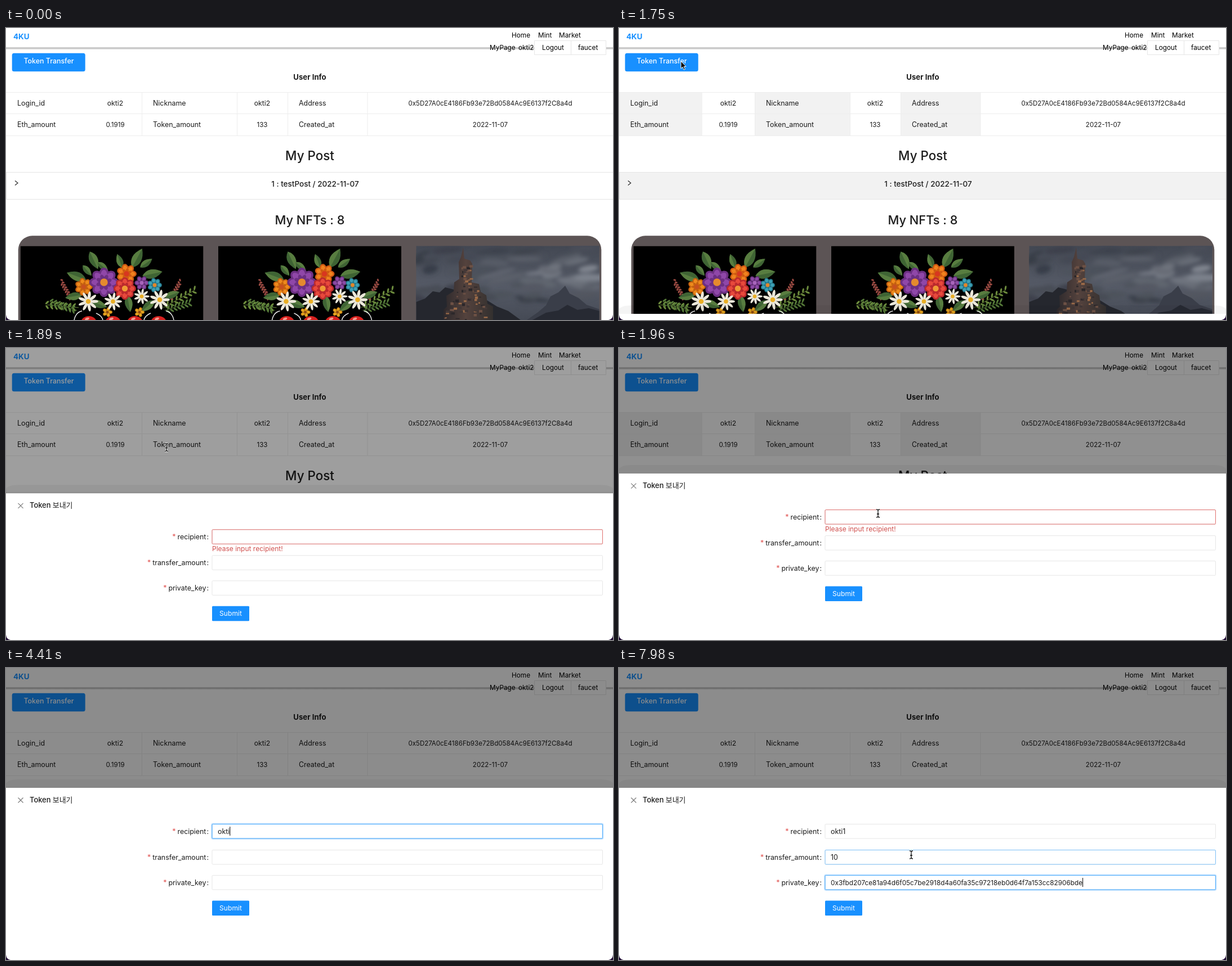
An HTML page for the animation above (8 s loop, 1078 by 519 pixels).

```html
<!DOCTYPE html>
<html lang="en">
<head>
<meta charset="utf-8">
<title>Token transfer</title>
<style>
  html, body { margin: 0; width: 100%; height: 100%; overflow: hidden; background: #fff; }
  svg { display: block; width: 1078px; height: 519px; }
  text { font: 12.4px Inter, "Noto Sans CJK KR", "Noto Sans CJK", sans-serif; fill: #1c1c1c; white-space: pre; }
  .nav text { font-size: 11.8px; fill: #000; }
  .num text, text.num { font-size: 11.6px; }
  text.num { font-size: 11.8px; }
  text.mid, .mid text { text-anchor: middle; }
  text.end { text-anchor: end; }
  text.big { font-size: 22.4px; font-weight: 500; }
  text.medium { font-weight: 500; }
  text.light { fill: #fff; }
  .rule { stroke: #ededed; fill: none; }
  .box { fill: #fff; stroke: #e6e6e6; }
  .ring { fill: none; stroke: #40a9ff; }
  .glow { fill: none; stroke: #1890ff; stroke-opacity: .25; stroke-width: 2.5; }
  .red { stroke: #e0706e; }
</style>
</head>
<body>
<svg viewBox="0 0 1078 519">
  <defs>
    <linearGradient id="sky" x2="0" y2="1">
      <stop stop-color="#434853"/><stop offset=".55" stop-color="#565b67"/><stop offset="1" stop-color="#454a55"/>
    </linearGradient>
    <linearGradient id="edge" x2="0" y2="1">
      <stop stop-color="#d8d8d8"/><stop offset=".5" stop-color="#c2c2c2"/><stop offset="1" stop-color="#e4e4e4"/>
    </linearGradient>
    <linearGradient id="stone">
      <stop stop-color="#2d292c"/><stop offset=".45" stop-color="#54423d"/><stop offset="1" stop-color="#33302f"/>
    </linearGradient>
    <filter id="soft"><feGaussianBlur stdDeviation="3.500"/></filter>
    <clipPath id="pic"><path d="M728.500 387.500h325V519h-325z"/></clipPath>
    <clipPath id="art"><path d="M25.500 387.500h325V519h-325z"/></clipPath>
  </defs>

  <rect width="1078" height="519" fill="#fff"/>
  <rect y="34" width="1078" height="4" fill="url(#edge)"/>
  <text x="13" y="20" style="font-size:13.4px;font-weight:700;fill:#1890ff">4KU</text>
  <path class="box" d="M938.500 22.500h127v25h-127zM1003.500 22.500v25"/>
  <g class="nav">
    <text x="898" y="17">Home</text><text x="945" y="17">Mint</text><text x="982" y="17">Market</text>
    <text x="859" y="39">MyPage</text><text x="910" y="39">okti2</text>
    <text x="952" y="39">Logout</text><text x="1016" y="39">faucet</text>
  </g>

  <rect x="10.700" y="44.700" width="130" height="32.600" rx="3.500" fill="#1890ff"/>
  <text class="mid light medium" x="76" y="62.500">Token Transfer</text>
  <text class="mid" x="539.500" y="92" style="font-size:13.200px;font-weight:700">User Info</text>

  <path id="tint" fill-opacity=".05" d="M0 115h148v76H0zM241 115h169v76H241zM500 115h142v76H500zM0 257h1078v47H0z"/>
  <path class="rule" d="M0 114.500H1078M0 152.500H1078M0 191.500H1078M241.500 115v76M410.500 115v76M500.500 115v76M642 115v76"/>
  <text x="20" y="138">Login_id</text><text x="20" y="176">Eth_amount</text>
  <text x="261" y="138">Nickname</text><text x="261" y="176">Token_amount</text>
  <text x="520" y="138">Address</text><text x="520" y="176">Created_at</text>
  <g class="num mid">
    <text x="194" y="137.500" style="font-size:12.200px">okti2</text><text x="194" y="176">0.1919</text>
    <text x="455" y="137.500" style="font-size:12.200px">okti2</text><text x="455" y="176">133</text>
    <text x="860" y="137.500">0x5D27A0cE4186Fb93e72Bd0584Ac9E6137f2C8a4d</text>
    <text x="860" y="176">2022-11-07</text>
  </g>

  <text class="mid big" x="539.500" y="235">My Post</text>
  <path class="rule" style="stroke:#e4e4e4" d="M.5 256.500H1078M.5 304.500H1078M.5 256v48"/>
  <path d="M16 271.500l5 4-5 4" fill="none" stroke="#222" stroke-width="1.100"/>
  <text class="mid medium" x="549" y="281.500" style="font-size:13.500px">1 : testPost / 2022-11-07</text>
  <text class="mid big" x="539.500" y="348.500" style="font-size:21.800px">My NFTs : 8</text>

  <rect x="21.700" y="369.300" width="1035.600" height="200" rx="25" fill="#5c5455"/>
  <g id="bouquet" clip-path="url(#art)"><rect x="25.500" y="387.500" width="325" height="132"/></g>
  <use href="#bouquet" x="351.500"/>
  <g clip-path="url(#pic)">
    <path d="M728 387h326v132H728z" fill="url(#sky)"/>
    <g id="clouds" filter="url(#soft)"></g>
    <path d="M925 519l20-14 14-12 8-16 14-7 12-12 8 14 16 8 14 12 23 8v19z" fill="#3a3e49"/>
    <path d="M935 519l24-13 22-4 16-10 18 9 20-3 19 5v16z" fill="#272a33"/>
    <path d="M728 519v-32l16-6 14-13 12 2 10-9 16 4 8-6 52 26 16 10 20 8 22 16z" fill="#25272e"/>
    <path d="M812 390l2 20 10 3 4 6-1 33 13 3 3 14 10 6 2 15 10 5v24h-88v-18l6-6-1-19 13-8 1-16 9-6-1-30 4-9z" fill="url(#stone)"/>
    <g id="castle"></g>
  </g>

  <rect id="mask" width="1078" height="519"/>
  <g id="drawer">
    <path fill-opacity=".045" d="M0 306V-8q4-7 22-7H1056q18 0 22 7V306z"/>
    <rect width="1078" height="320" fill="#fff"/>
    <path d="M21.500 17.500l9 9m0-9l-9 9" stroke="#777" stroke-width="1.100"/>
    <text class="medium" x="42" y="26" style="font-size:12.900px">Token 보내기</text>
    <g id="form"></g>
    <text id="error" x="366" y="102.500" style="font-size:12px;fill:#d0504e">Please input recipient!</text>
    <rect x="366" y="200.500" width="66" height="26.500" rx="1.500" fill="#1890ff"/>
    <text class="mid light" x="399" y="217.500" style="font-size:12.100px">Submit</text>
    <rect id="caret" width="1" height="16"/>
  </g>
  <path d="M0 510q1 8 8 9H0zM1078 510q-1 8-8 9h8z" fill="#241038"/>
  <path id="arrow" d="M0 0v13l3-2.700 2.200 5 2.200-1-2.200-4.800H9z" fill="#000" stroke="#fff"/>
  <g id="beam" fill="none">
    <path d="M-3-7q3 0 3 2 0-2 3-2M0-5V5M-3 7q3 0 3-2 0 2 3 2M-2 1h4" stroke="#fff" stroke-width="3"/>
    <path d="M-3-7q3 0 3 2 0-2 3-2M0-5V5M-3 7q3 0 3-2 0 2 3 2M-2 1h4" stroke="#111" stroke-width="1.300"/>
  </g>
</svg>
<script>
const $ = id => document.getElementById(id);
const add = (parent, markup) => parent.insertAdjacentHTML('beforeend', markup);
const clamp = v => Math.min(1, Math.max(0, v));
const ramp = (t, start, span = 280) => clamp((t - start) / span);
const show = (el, on) => { el.style.opacity = +on; };

let seed = 7;
function rand(min, max) {
  seed = seed * 16807 % 2147483647;
  return min + (max - min) * seed / 2147483647;
}

// ---- pictures ----
const art = $('bouquet');
const oval = (x, y, rx, ry, turn, fill) =>
  `<ellipse cx="${x}" cy="${y}" rx="${rx}" ry="${ry}" transform="rotate(${turn} ${x} ${y})" fill="${fill}"/>`;

function leaf(x, y, size, turn) {
  add(art, `<g transform="translate(${x} ${y}) rotate(${turn})">
    <path d="M${-size} 0Q${-size * .2} ${-size * .9} ${size} 0Q${-size * .2} ${size * .9} ${-size} 0" fill="#3f6434"/>
    <path d="M${-size} 0Q${-size * .2} ${-size * .9} ${size} 0" fill="#587d40"/></g>`);
}

function petals(x, y, r, count, fill, slim, offset = 0) {
  let out = '';
  for (let i = 0; i < count; i++) {
    const turn = offset + i * 360 / count, a = turn * Math.PI / 180;
    out += oval(x + Math.cos(a) * r * .56, y + Math.sin(a) * r * .56, r * .44, r * slim, turn, fill);
  }
  return out;
}

function flower(x, y, r, count, fill, shade, core) {
  add(art, petals(x, y, r, count, shade, .34) + petals(x, y, r * .86, count, fill, .26)
    + petals(x, y, r * .55, count, shade, .26, 25) + oval(x, y, r * .26, r * .26, 0, core));
}

const daisy = (x, y, r) =>
  add(art, petals(x, y, r, 9, '#ece8da', .15) + oval(x, y, r * .24, r * .24, 0, '#e9ae25'));

function sprig(x, y, dx, dy, fill, size) {
  let out = `<path d="M${x} ${y}l${dx} ${dy}" stroke="${fill}"/>`;
  for (let i = 1; i <= 7; i++) {
    const px = x + dx * i / 7, py = y + dy * i / 7;
    const turn = Math.atan2(dy, dx) * 180 / Math.PI;
    out += oval(px, py - 4, size, 1.6, turn - 50, fill) + oval(px, py + 4, size, 1.6, turn + 50, fill);
  }
  add(art, out);
}

for (const side of [-1, 1]) {
  sprig(204 + side * 75, 497, side * 56, side > 0 ? -31 : -5, '#6d8c3d', 4);
  sprig(204 + side * 78, 502, side * 45, -14, '#557a39', 4);
  sprig(204 + side * 88, 482, side * 17, -30, '#9a4a42', 2.5);
}
[[156, 413, 17, 65], [233, 409, 19, -62], [202, 414, 13, -110], [260, 437, 18, -12], [249, 418, 13, -35],
 [125, 441, 18, 200], [144, 431, 12, 50], [172, 424, 12, 40], [120, 477, 15, 170], [295, 474, 14, -20],
 [165, 491, 15, 20], [218, 490, 15, 80], [252, 494, 15, 140]].forEach(l => leaf(...l));
flower(241, 453, 13, 6, '#8d4aa6', '#643078', '#a865bb');
flower(138, 460, 16, 7, '#ee8a1c', '#c4600f', '#c8501f');
flower(214, 437, 18, 7, '#f0821e', '#cf5a12', '#d8371f');
flower(174, 452, 26, 8, '#8f47a8', '#6c2f82', '#e58a2e');
flower(211, 463, 20, 8, '#e8493c', '#bb2a2c', '#f09a36');
flower(264, 457, 13, 7, '#3ea1b6', '#25778a', '#e3862a');
flower(180, 505, 9, 5, '#e7a91f', '#c07d18', '#8d4c12');
flower(237, 505, 9, 5, '#e7a91f', '#c07d18', '#8d4c12');
daisy(146, 486, 18);
daisy(190, 486, 16);
daisy(241, 477, 14);
daisy(273, 483, 18);
for (const x of [147, 190, 229, 271])
  add(art, oval(x, 524, 14, 12, 0, '#d8211f') + oval(x - 3, 517, 4, 2, -20, '#f59a90'));
add(art, '<path d="M121 519q3-14 14-16M298 519q-3-14-14-16M172 519q-2-8-12-12M245 519q2-8 12-12" stroke="#eee" fill="none" stroke-width="1.500"/>');

for (let i = 0; i < 60; i++) {
  const x = rand(728, 1054), y = rand(387, 490);
  const light = clamp((x - 800) / 250) * clamp(1 - Math.abs(y - 435) / 45);
  const tone = 62 + light * 75 + rand(-8, 14);
  add($('clouds'), oval(x, y, rand(12, 36), rand(3, 8), rand(-18, 8), `rgb(${tone} ${tone + 5} ${tone + 15})`));
}
for (let i = 0; i < 90; i++) {
  const y = rand(420, 519), half = y < 452 ? 9 : 10 + (y - 445) * .48;
  const fill = ['#6d5145', '#9a6a48', '#2b272a', '#433837'][i % 4];
  add($('castle'), `<rect x="${817 + rand(-half, half)}" y="${y}" width="${rand(2, 7)}" height="${rand(1.500, 5)}" fill="${fill}"/>`);
}

// ---- form ----
const KEY = '0x3fbd207ce81a94d6f05c7be2918d4a60fa35c97218eb0d64f7a153cc82906bde';
const fields = [
  { label: 'recipient', y: 64, focus: 2800, tint: 3850, blur: 5040, value: 'okti1', keys: [3850, 4060, 4200, 4340, 4550] },
  { label: 'transfer_amount', y: 110, focus: 5040, tint: 5040, blur: 5740, value: '10', keys: [5460, 5600] },
  { label: 'private_key', y: 155, focus: 5740, tint: 5740, blur: 9000, value: KEY, keys: [7560], paste: true }
];
for (const f of fields) {
  const rect = (cls, grow = 0) => `<rect class="${cls}" x="${366 - grow}" y="${f.y + .5 - grow}"
    width="${693.500 + 2 * grow}" height="${25.500 + 2 * grow}" rx="1.500"/>`;
  const g = document.createElementNS('http://www.w3.org/2000/svg', 'g');
  $('form').append(g);
  add(g, `<text class="end" x="360" y="${f.y + 17.500}"><tspan fill="#e0504e">*</tspan><tspan dx="3">${f.label}</tspan><tspan dx="1">:</tspan></text>
    ${rect('box')}${rect('glow', .500)}${rect('ring')}${rect('ring red')}
    <text class="${f.paste ? 'num' : ''}" x="376" y="${f.y + 17.500}"></text>`);
  [f.glow, f.ring, f.red] = [...g.querySelectorAll('rect')].slice(1);
  f.text = g.lastElementChild;
}

// ---- pointer: time, x, y ----
const trail = [
  [70, 1040, 505], [280, 640, 330], [490, 640, 330], [1260, 110, 59], [1820, 110, 59], [1960, 460, 294],
  [2310, 460, 294], [2380, 466, 284], [2800, 466, 284], [3150, 484, 293], [3640, 484, 293],
  [7770, 548, 384], [7980, 519, 332], [8000, 519, 332]
];
function pointer(t) {
  const hidden = t < 70 || (t >= 3640 && t < 7770);
  const i = Math.max(1, trail.findIndex(k => k[0] > t));
  const [a, b] = [trail[i - 1], trail[i]];
  const p = clamp((t - a[0]) / (b[0] - a[0]));
  const at = `translate(${a[1] + (b[1] - a[1]) * p} ${a[2] + (b[2] - a[2]) * p})`;
  show($('arrow'), !hidden && t < 1890);
  show($('beam'), !hidden && t >= 1890);
  $('arrow').setAttribute('transform', at);
  $('beam').setAttribute('transform', at);
}

function caretOn(t) {
  if (t < 2800) return false;
  if (t >= 6230 && t < 6790) return false;
  return !(t >= 7280 && t < 7560);
}

function draw(t) {
  const slide = 1 - (1 - ramp(t, 1746.500, 350)) ** 3.620;
  show($('drawer'), slide > 0);
  $('drawer').setAttribute('transform', `translate(0 ${519 - 306 * slide})`);
  show($('mask'), .45 * ramp(slide, .04, .96));
  show($('tint'), (t >= 1750 && t < 1820) || (t >= 1960 && t < 2030));

  const cleared = ramp(t, 3850);
  show($('error'), 1 - cleared);
  show($('caret'), caretOn(t));
  fields.forEach((f, i) => {
    const lit = ramp(t, f.tint) - ramp(t, f.blur);
    const hover = i === 1 ? ramp(t, 7770, 210) * .75 : 0;
    const typed = f.keys.filter(k => k <= t).length;
    f.text.textContent = f.paste && typed ? f.value : f.value.slice(0, typed);
    show(f.glow, lit);
    show(f.ring, Math.max(lit, hover) * .85);
    show(f.red, i ? 0 : 1 - cleared);
    if (t >= f.focus && t < f.blur) {
      $('caret').setAttribute('x', 376 + (typed ? f.text.getComputedTextLength() : 0));
      $('caret').setAttribute('y', f.y + 5);
    }
  });
  pointer(t);
}

const STEP = 70, LOOP = 8000;
const start = performance.now();
function tick() {
  const t = (performance.now() - start) % LOOP;
  draw(Math.floor(t / STEP) * STEP);
  requestAnimationFrame(tick);
}
tick();
</script>
</body>
</html>
```
